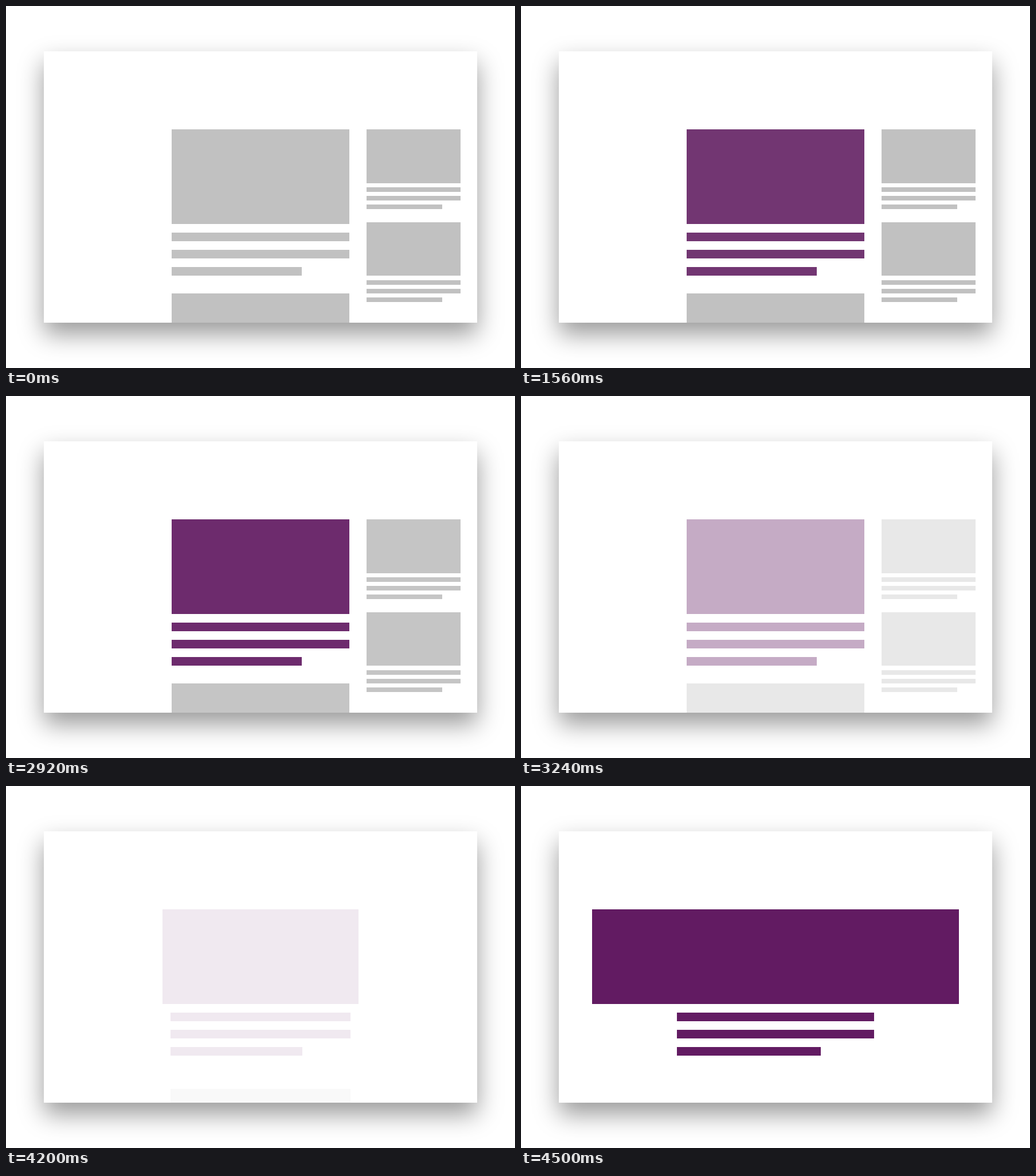
These frames come from a looping animation (888x631 px, 7600 ms). An HTML page with a canvas:

```html
<!DOCTYPE html>
<html lang="en">
<head>
<meta charset="utf-8">
<title>Article transition</title>
<style>
html, body { margin: 0; width: 100%; height: 100%; overflow: hidden; background: #fff; }
canvas {
  position: absolute; left: 66px; top: 79px; width: 756px; height: 473px;
  background: #fff; box-shadow: 0 20px 40px rgba(0, 0, 0, .4);
}
</style>
</head>
<body>
<canvas id="card" width="756" height="473"></canvas>
<script>
const LOOP = 7600;
const GREY = [193, 193, 193];
const PURPLE = [98, 27, 98];
const ctx = document.getElementById('card').getContext('2d');

const lerp = (a, b, p) => a + (b - a) * p;
const swing = t => .5 - Math.cos(Math.PI * t) / 2;
const rgb = c => `rgb(${c.map(Math.round)})`;

// Runs of evenly spaced steps along the swing curve, from phase `from` to 1.
function stepped(time, start, end, count, from, first = 1) {
  if (time < start) return swing(from);
  const step = Math.min(count - 1, Math.floor((time - start) / (end - start) * (count - 1) + 1e-6));
  return swing(lerp(from, 1, (step + first) / (count - 1 + first)));
}

const tint = time => time < 1000 ? 0 : stepped(time, 1280, 1700, 6, .205);
const fadeOut = time => time < 2920 ? 0 : stepped(time, 3060, 3380, 8, .17);
const open = time => time < 4200 ? 0 : stepped(time, 4200, 4500, 8, .2, 0);

function box(left, top, right, bottom) {
  const [l, t, r, b] = [left, top, right, bottom].map(Math.round);
  ctx.fillRect(l, t, r - l, b - t);
}

function textLines(left, right, shortRight, top, height, gap) {
  [right, right, shortRight].forEach((end, i) =>
    box(left, top + i * gap, end, top + i * gap + height));
}

function sidebar() {
  for (const top of [215, 377]) {
    box(629, top, 793, top + (top === 215 ? 94 : 93));
    textLines(629, 793, 761, top + 101, 8, 15);
  }
}

function draw(time) {
  const p = open(time);
  const opening = time >= 4200;
  ctx.setTransform(1, 0, 0, 1, 0, 0);
  ctx.clearRect(0, 0, 756, 473);
  ctx.translate(-66, -79);
  ctx.globalAlpha = opening ? p : 1 - fadeOut(time);

  const textLeft = lerp(289, 272, p);
  const textRight = lerp(599, 616, p);
  ctx.fillStyle = rgb(GREY);
  box(textLeft, 501 + 280 * p, textRight, 665 + 280 * p);
  if (!opening) sidebar();

  const mix = tint(time);
  ctx.fillStyle = rgb(GREY.map((v, i) => lerp(v, PURPLE[i], mix)));
  box(lerp(289, 124, p), 215, lerp(599, 764, p), 380);
  textLines(textLeft, textRight, lerp(516, 523, p), 395, 15, 30.2);
}

const begin = performance.now();
function tick() {
  draw((performance.now() - begin) % LOOP);
  requestAnimationFrame(tick);
}
tick();
</script>
</body>
</html>
```
